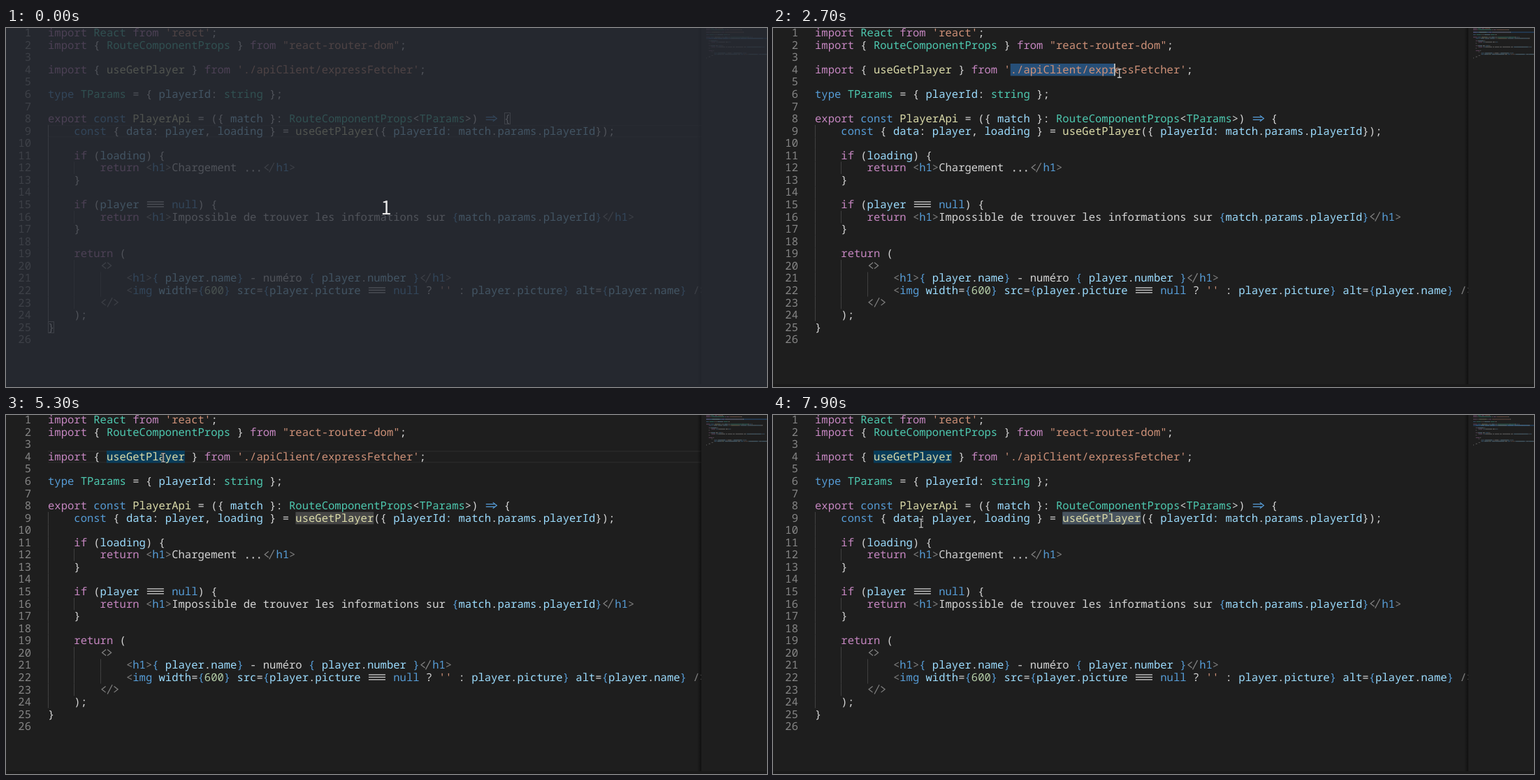
These frames come from a looping animation (1089x514 px, 8 s). An HTML page with a canvas:

```html
<!DOCTYPE html>
<html lang="fr">
<head>
<meta charset="utf-8">
<title>Code editor</title>
<style>
html, body { margin: 0; width: 100%; height: 100%; overflow: hidden; background: #1e1e1e; }
canvas { display: block; }
</style>
</head>
<body>
<canvas id="stage" width="1089" height="514"></canvas>
<script>
const ctx = document.getElementById('stage').getContext('2d');
const LOOP = 8000, TICK = 100, BLINK = 500;
const LEFT = 60, CELL = 9.325, ROW = 17.56, TOP = -1.7, BASE = 13.9;
const MAP = 995, MAP_LEFT = 1002, MAP_SCALE = 0.1;

const COLORS = {
  p: '#c586c0', v: '#9cdcfe', s: '#ce9178', t: '#4ec9b0', f: '#dcdcaa',
  k: '#569cd6', w: '#d4d4d4', g: '#808080', n: '#b5cea8'
};

// "~x" switches to colour x.
const source = `~pimport ~tReact ~pfrom ~s'react'~w;
~pimport ~w{ ~tRouteComponentProps ~w} ~pfrom ~s"react-router-dom"~w;

~pimport ~w{ ~fuseGetPlayer ~w} ~pfrom ~s'./apiClient/expressFetcher'~w;

~ktype ~tTParams ~w= { ~vplayerId~w: ~tstring ~w};

~pexport ~kconst ~fPlayerApi ~w= ({ ~vmatch ~w}: ~tRouteComponentProps~w<~tTParams~w>) ~k=> ~w{
    ~kconst ~w{ ~vdata~w: ~vplayer~w, ~vloading ~w} = ~fuseGetPlayer~w({ ~vplayerId: match~w.~vparams~w.~vplayerId~w});

    ~pif ~w(~vloading~w) {
        ~preturn ~g<~kh1~g>~wChargement ...~g</~kh1~g>
    ~w}

    ~pif ~w(~vplayer ~w=== ~knull~w) {
        ~preturn ~g<~kh1~g>~wImpossible de trouver les informations sur ~k{~vmatch~w.~vparams~w.~vplayerId~k}~g</~kh1~g>
    ~w}

    ~preturn ~w(
        ~g<>
            ~g<~kh1~g>~k{ ~vplayer~w.~vname~k} ~w- numéro ~k{ ~vplayer~w.~vnumber ~k}~g</~kh1~g>
            ~g<~kimg ~vwidth~w=~k{~n600~k} ~vsrc~w=~k{~vplayer~w.~vpicture ~w=== ~knull ~w? ~s'' ~w: ~vplayer~w.~vpicture~k} ~valt~w=~k{~vplayer~w.~vname~k} ~g/>
        ~g</>
    ~w);
~w}
`;

// Each line becomes a list of {text, col, color}.
const lines = source.split('\n').map(line => {
  let col = 0;
  return line.split('~').flatMap((part, i) => {
    const text = i ? part.slice(1) : part;
    const color = COLORS[i ? part[0] : 'w'];
    return (text.match(/===|=>|<\/>|<>|<\/|\.\.\.|./g) || []).map(piece => {
      const token = { text: piece, col, color };
      col += piece.length;
      return token;
    });
  });
});
const plain = lines.map(tokens => tokens.map(token => token.text).join(''));

// Indent guides per line; a blank line takes the smaller neighbouring indent.
const indent = i => (plain[i] || '').search(/\S/);
const guides = plain.map((text, i) =>
  Math.max(0, text ? indent(i) : Math.min(indent(i - 1), indent(i + 1))) / 4);

// Joined symbols, relative to cell start and baseline
const open = x => `M${x + 5.5} -10L${x} -5.7L${x + 5.5} -1.4`;
const close = x => `M${x} -10L${x + 5.5} -5.7L${x} -1.4`;
const slash = x => `M${x} 1L${x + 7} -12.3`;
const bar = (y, width) => `M2 ${y}h${width}`;
const dot = x => `M${x} -1.6h2M${x} -.6h2`;
const ligatures = {
  '===': bar(-9.2, 24) + bar(-5.7, 24) + bar(-2.2, 24),
  '=>': bar(-7.6, 13) + bar(-3.8, 13) + close(12),
  '</': open(2.5) + slash(9),
  '<>': open(3) + close(10.5),
  '</>': open(2.5) + slash(10.5) + close(20),
  '...': dot(4.5) + dot(13) + dot(21.5)
};
for (const key in ligatures) ligatures[key] = new Path2D(ligatures[key]);

const smooth = k => k * k * (3 - 2 * k);
const brake = k => 1 - (1 - k) ** 3.2;
const overshoot = k => 1 + 3.6 * (k - 1) ** 3 + 2.6 * (k - 1) ** 2;

// Pointer rests: each move leads from the previous place to the next.
const entry = [432, 86];
const moves = [
  { start: 900, end: 1950, to: [345, 61], ease: smooth, bend: 0 },
  { start: 2200, end: 3050, to: [584, 67], ease: smooth, bend: 0 },
  { start: 4000, end: 4600, to: [225, 61], ease: brake, bend: 24 },
  { start: 6000, end: 6400, to: [447, 144], ease: overshoot, bend: 24 },
  { start: 7400, end: 7900, to: [212, 155], ease: smooth, bend: 0 }
];

function pointerAt(t) {
  let [x, y] = entry;
  for (const { start, end, to, ease, bend } of moves) {
    if (t < start) break;
    const s = ease(Math.min(1, (t - start) / (end - start)));
    x += (to[0] - x) * s;
    y += (to[1] - y) * s + bend * Math.sin(Math.PI * s);
  }
  return [x, y];
}

const WORD = 'useGetPlayer';
const wordCol = line => plain[line - 1].indexOf(WORD);
const colX = col => LEFT + col * CELL;
const rowY = line => TOP + (line - 1) * ROW;
const colAt = t => Math.floor((pointerAt(t)[0] - LEFT) / CELL);

const click = (time, line) => ({ time, line, anchor: colAt(time), caret: colAt(time) });
const pickWord = (time, line) =>
  ({ time, line, anchor: wordCol(line), caret: wordCol(line) + WORD.length });
const dragTo = t => ({ ...click(2200, 4), caret: colAt(t), time: t });

function cursorAt(t) {
  if (t < 2200) return { time: -Infinity, line: 9, anchor: 4, caret: 4 };
  if (t < 4800) return dragTo(Math.min(t, 3000 + (t > 3000) * TICK));
  if (t < 5600) return click(4800, 4);
  if (t < 6900) return pickWord(5600, 4);
  if (t < 7400) return click(6900, 9);
  return pickWord(7400, 9);
}

function box(color, x, y, w, h) {
  ctx.fillStyle = color;
  ctx.fillRect(x, y, w, h);
}

function span(color, line, from, to) {
  box(color, colX(from), rowY(line), (to - from) * CELL, ROW);
}

function drawGuides(active) {
  guides.forEach((count, i) => {
    for (let k = 0; k < count; k++)
      box(active && !k ? '#707070' : '#404040', Math.round(colX(4 * k)), rowY(i + 1), 1, ROW);
  });
}

function drawBracket(line, char) {
  const x = colX(plain[line - 1].lastIndexOf(char));
  ctx.strokeStyle = '#888';
  ctx.lineWidth = 1;
  ctx.strokeRect(Math.round(x) + 0.5, Math.round(rowY(line)) + 0.5, 8, 16);
}

function drawCode() {
  ctx.font = '15.54px "Noto Sans Mono", "DejaVu Sans Mono", monospace';
  ctx.textRendering = 'geometricPrecision';
  ctx.textAlign = 'left';
  ctx.lineWidth = 1.25;
  lines.forEach((tokens, i) => {
    const y = rowY(i + 1) + BASE;
    const label = String(i + 1);
    ctx.fillStyle = '#858585';
    [...label].forEach((d, k) => ctx.fillText(d, 36 - (label.length - k) * CELL, y));
    for (const { text, col, color } of tokens) {
      ctx.fillStyle = ctx.strokeStyle = color;
      if (ligatures[text]) {
        ctx.save();
        ctx.translate(colX(col), y);
        ctx.stroke(ligatures[text]);
        ctx.restore();
      } else if (text !== ' ') {
        ctx.fillText(text, colX(col), y);
      }
    }
  });
}

function drawMinimap(line) {
  const shade = ctx.createLinearGradient(MAP - 6, 0, MAP, 0);
  shade.addColorStop(0, 'rgba(0,0,0,0)');
  shade.addColorStop(1, 'rgba(0,0,0,.45)');
  box(shade, MAP - 6, 0, 6, 514);
  box('#1e1e1e', MAP, 0, 94, 514);
  const mapY = row => (row - 1) * ROW * MAP_SCALE;
  box('rgba(38,79,120,.6)', MAP_LEFT, mapY(line), 87, 1.7);
  ctx.globalAlpha = 0.45;
  lines.forEach((tokens, i) => {
    for (const { text, col, color } of tokens)
      if (text !== ' ')
        box(color, MAP_LEFT + col * CELL * MAP_SCALE, mapY(i + 1) + 0.3, text.length * 0.85, 1);
  });
  ctx.globalAlpha = 1;
}

function drawPointer(x, y) {
  const beam = new Path2D(`M${x - 3} ${y - 6}h6m-3 0v12m-3 0h6`);
  for (const [color, width] of [['#111', 3], ['#e8e8e8', 1.2]]) {
    ctx.strokeStyle = color;
    ctx.lineWidth = width;
    ctx.stroke(beam);
  }
}

function draw(t) {
  const { time, line, anchor, caret } = cursorAt(t);
  const empty = anchor === caret;
  const inBlock = line === 9 && empty;

  box('#1e1e1e', 0, 0, 1089, 514);
  if (empty) {
    box('#282828', LEFT, rowY(line), MAP - LEFT, 1.7);
    box('#282828', LEFT, rowY(line + 1) - 1.7, MAP - LEFT, 1.7);
  } else {
    span('#264f78', line, anchor, caret);
  }
  if (t >= 5100) {
    span('rgba(0,73,114,.72)', 4, wordCol(4), wordCol(4) + WORD.length);
    span('rgba(87,87,87,.72)', 9, wordCol(9), wordCol(9) + WORD.length);
  }
  drawGuides(inBlock);
  if (inBlock) {
    drawBracket(8, '{');
    drawBracket(25, '}');
  }
  drawCode();
  if (Math.floor((t - time) / BLINK) % 2 === 0)
    box('#d0d0ce', colX(caret) - 0.8, rowY(line), 1.6, ROW);
  drawMinimap(line);
  box('#191919', 0, 510, 1089, 4);
  if (t >= 1000) drawPointer(...pointerAt(t));

  if (t < 400) {
    box('rgba(40,44,53,.77)', 0, 0, 1089, 514);
    ctx.font = '27px "Noto Sans CJK JP", "DejaVu Sans", sans-serif';
    ctx.textAlign = 'center';
    ctx.fillStyle = '#e8e8e8';
    ctx.fillText('1', 544, 267);
  }
}

const start = performance.now();
let shown = -1;
function frame() {
  const t = Math.floor((performance.now() - start) % LOOP / TICK) * TICK;
  if (t !== shown) draw(shown = t);
  requestAnimationFrame(frame);
}
frame();
</script>
</body>
</html>
```
